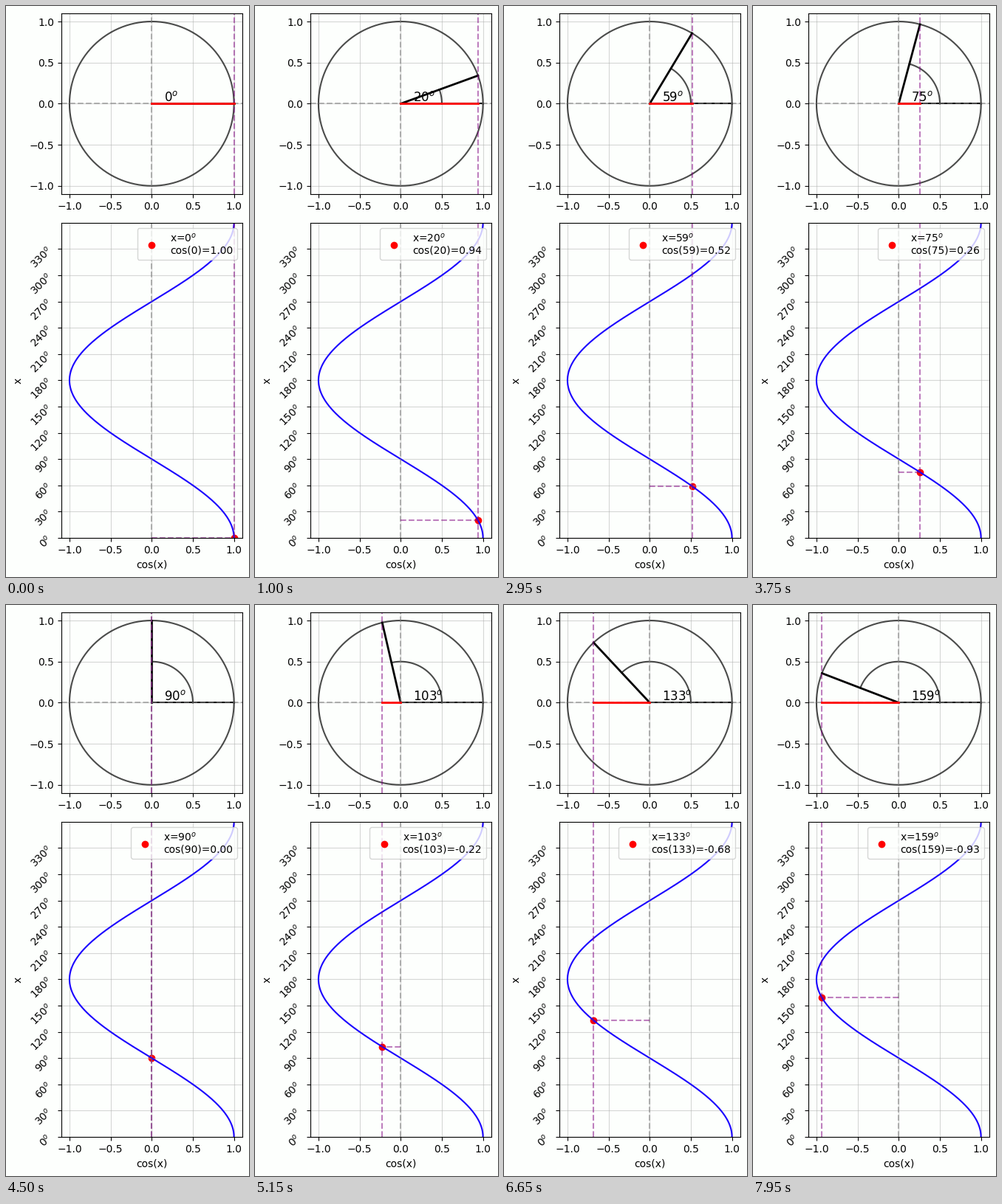
Animation, 329 px wide and 774 px high, one loop 8000 ms. Source, as a matplotlib script:

```python
import numpy as np
import matplotlib.pyplot as plt
from matplotlib.animation import FuncAnimation

W, H, DPI = 329, 774, 100
FRAMES, STEP_MS = 160, 50
PAPER = "#fdfffd"

plt.rcParams.update({"font.family": "DejaVu Sans", "axes.facecolor": PAPER})
fig = plt.figure(figsize=(W / DPI, H / DPI), dpi=DPI, facecolor=PAPER)


def add_axes(left, top, right, bottom):
    """Axes placed by pixel edges measured from the top left corner."""
    ax = fig.add_axes([left / W, 1 - bottom / H,
                       (right - left) / W, (bottom - top) / H])
    ax.set_xlim(-1.1, 1.1)
    ax.set_xticks(np.arange(-1, 1.1, 0.5))
    ax.grid(alpha=0.5)
    return ax


def polar(r, degrees):
    t = np.radians(degrees)
    return r * np.cos(t), r * np.sin(t)


guide = dict(color="gray", alpha=0.57, ls="--", lw=1.5)
marker = dict(color="purple", alpha=0.5, ls="--", lw=1.5)
outline = dict(color="black", alpha=0.7, lw=1.5)
turn = np.arange(0, 361)

# Unit circle
top = add_axes(74.8, 9.9, 319.8, 254.9)
top.set_ylim(-1.1, 1.1)
top.set_yticks(np.arange(-1, 1.1, 0.5))
top.plot(*polar(1, turn), **outline)
top.plot([0, 1], [0, 0], color="black", lw=1.5)
radius, = top.plot([], [], color="black", lw=2)
arc, = top.plot([], [], **outline)
top.axhline(0, **guide)
top.axvline(0, **guide)
top_mark = top.axvline(1, **marker)
shadow, = top.plot([], [], color="red", lw=2)
angle_text = top.text(0.15, 0.03, "", fontsize=12)

# Cosine curve, angle running upwards
low = add_axes(74.8, 293.9, 319.8, 720.9)
low.set_ylim(0, 360)
ticks = range(0, 360, 30)
low.set_yticks(ticks, [f"{d}$^o$" for d in ticks], rotation=45)
low.set_xlabel("cos(x)")
low.set_ylabel("x")
low.plot(np.cos(np.radians(turn)), turn, color="#1a00ff", lw=1.5)
low.axvline(0, **guide)
low_mark = low.axvline(1, **marker)
level, = low.plot([], [], **marker)
dot = low.scatter([1], [0], color="red", label="x")
legend = low.legend(loc="upper right")
legend_text = legend.get_texts()[0]


def update(angle):
    x, y = polar(1, angle)
    radius.set_data([0, x], [0, y])
    arc.set_data(*polar(0.5, np.linspace(0, angle, angle + 2)))
    shadow.set_data([0, x], [0, 0])
    angle_text.set_text(f"{angle}$^o$")
    for line in (top_mark, low_mark):
        line.set_xdata([x, x])
    level.set_data([0, x], [angle, angle])
    dot.set_offsets([[x, angle]])
    legend_text.set_text(f"x={angle}$^o$\ncos({angle})={x:.2f}")
    return []


anim = FuncAnimation(fig, update, frames=FRAMES, interval=STEP_MS,
                     init_func=lambda: update(0), repeat=True, repeat_delay=0)
plt.show()
```
